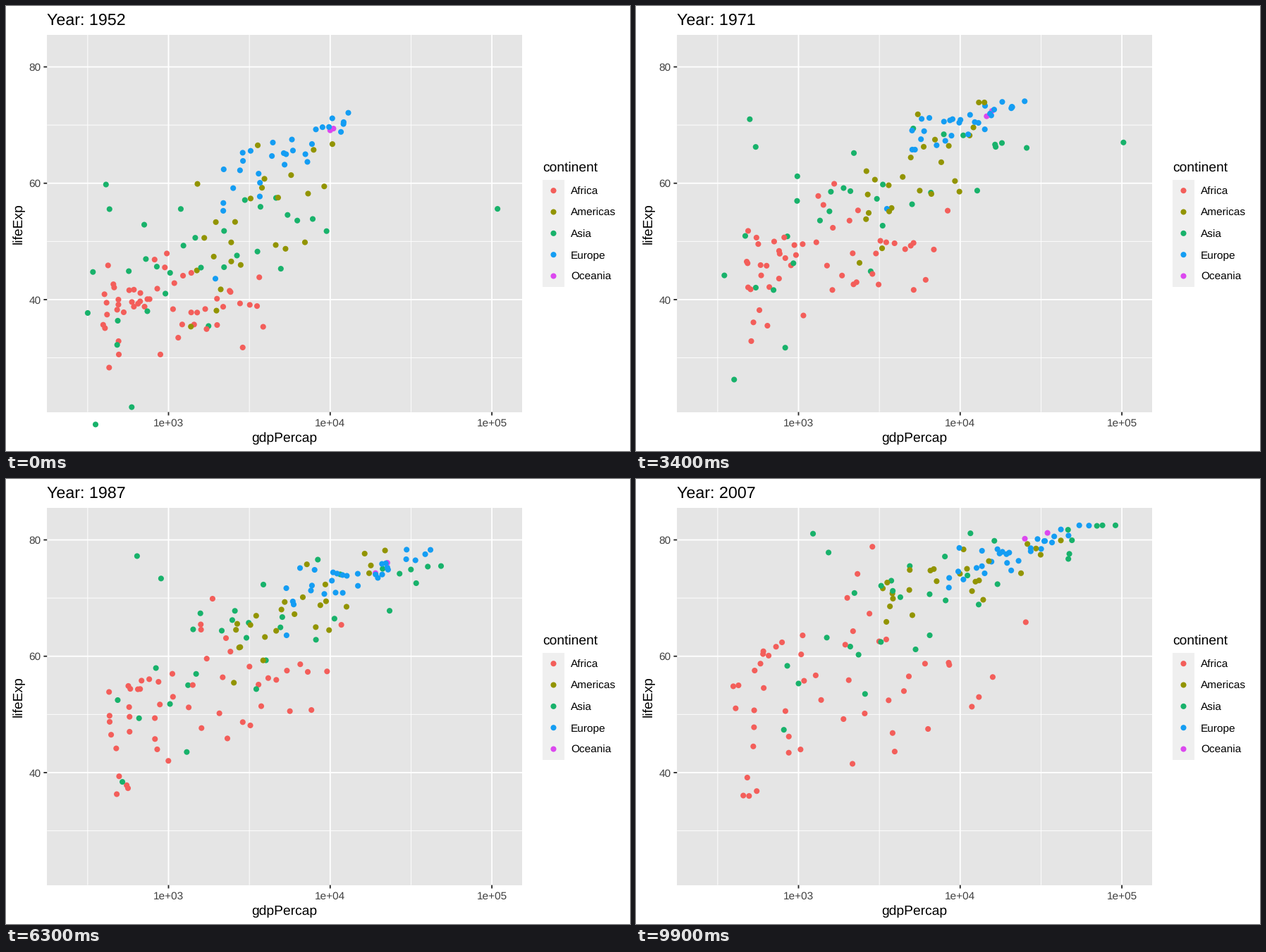
Write a matplotlib script that moves like this. It is 885x632 px and loops after 10000 ms.

```python
import matplotlib.pyplot as plt
import numpy as np
from matplotlib.animation import FuncAnimation
from matplotlib.patches import Rectangle

W, H, DPI = 885, 632, 100
FRAMES, INTERVAL = 100, 100
PT = 72 / DPI  # points per pixel

COLORS = {"Africa": "#F35E5A", "Americas": "#929400", "Asia": "#18B26B",
          "Europe": "#149DF3", "Oceania": "#DC48EF"}

WAVES = np.arange(1952, 2008, 5)
YEARS = np.linspace(1952, 2007, FRAMES)
rng = np.random.default_rng(52)

# Per cloud: dots, skew of income, narrowing of the spread with income, and
# (year, log income, its spread, life expectancy, slope, scatter) on the way.
CLOUDS = {
    "Africa": (51, 0.2, 0.0, [(1952, 2.98, 0.28, 39.1, 5, 4.8), (1977, 3.18, 0.36, 49.6, 9, 6.0),
                              (1992, 3.14, 0.40, 54.2, 13, 6.8), (2007, 3.21, 0.44, 54.9, 8, 8.7)]),
    "Americas": (25, 0.1, 0.3, [(1952, 3.52, 0.24, 53.3, 20, 7.2), (1977, 3.79, 0.23, 64.4, 22, 4.8),
                                (1992, 3.79, 0.30, 69.6, 12, 3.6), (2007, 3.95, 0.32, 73.6, 8, 3.0)]),
    "Asia": (32, 0.1, 0.3, [(1952, 3.14, 0.41, 46.0, 11, 8.0), (1977, 3.42, 0.53, 59.4, 12, 7.2),
                            (1992, 3.60, 0.52, 66.4, 10, 5.6), (2007, 3.79, 0.52, 70.5, 11, 5.2)]),
    "Europe": (29, 0.0, 0.3, [(1952, 3.71, 0.23, 65.1, 14, 2.3), (1977, 4.12, 0.18, 72.2, 7, 1.2),
                              (1992, 4.16, 0.27, 74.7, 8, 1.7), (2007, 4.34, 0.22, 77.9, 10, 1.3)]),
}

# Dots that travel apart from their cloud: (year, log income, life expectancy).
LONERS = [
    ("Oceania", [(1952, 4.00, 69.1), (1977, 4.26, 73.5), (2007, 4.54, 81.2)]),
    ("Oceania", [(1952, 4.02, 69.4), (1977, 4.21, 72.2), (1987, 4.28, 74.3), (2007, 4.40, 80.2)]),
    ("Asia", [(1952, 5.035, 55.6), (1957, 5.055, 58.0), (1967, 4.908, 64.6), (1972, 5.039, 67.7),
              (1977, 4.773, 69.3), (1982, 4.496, 71.3), (2007, 4.675, 77.6)]),
    ("Africa", [(1952, 2.69, 40.0), (1987, 2.93, 44.0), (1992, 2.87, 23.6),
                (1997, 2.77, 36.1), (2007, 2.94, 46.2)]),
    ("Europe", [(1952, 3.29, 43.6), (1977, 3.63, 59.5), (2007, 3.93, 71.8)]),
]


def px(log_income):
    return 230.5 + 229.3 * (log_income - 3)


def py(life):
    return 417 - 8.263 * (life - 40)


def along(times, stops):
    """Columns of the stops, interpolated at the given times."""
    year, *columns = np.transpose(stops)
    return [np.interp(times, year, c) for c in columns]


def turn(a, b, angle):
    """Blend slowly from a to b, one row per wave."""
    angle = np.linspace(0, angle, len(WAVES))[:, None]
    return a * np.cos(angle) + b * np.sin(angle)


def normals(n):
    v = rng.standard_normal(n)
    return np.clip((v - v.mean()) / v.std(), -2, 1.8)


def cloud_tracks(n, skew, narrowing, stops):
    mean, spread, life, slope, scatter = (c[:, None] for c in along(WAVES, stops))
    ranks = np.linspace(-1.75, 1.75, n)
    u = turn(rng.permutation(ranks), rng.permutation(ranks), 0.3)
    v = turn(normals(n), normals(n), 0.7)
    u = u + skew * (u ** 2 - 1)
    x = mean + spread * u + rng.normal(0, 0.02, u.shape)
    y = life + slope * spread * u + scatter * (1 - narrowing * u) * v
    y = np.minimum(y + rng.normal(0, 0.3, y.shape), 70 + 12.5 * (WAVES[:, None] - 1937) / 70)
    for i in range(n):
        yield [np.interp(YEARS, WAVES, c[:, i]) for c in (x, y)]


dots = [(name, along(YEARS, stops)) for name, stops in LONERS]
for name, spec in CLOUDS.items():
    dots += [(name, t) for t in cloud_tracks(*spec)]
dots = [dots[i] for i in rng.permutation(len(dots))]
tracks = np.array([np.column_stack([px(x), py(y)]) for _, (x, y) in dots])

plt.rcParams["font.family"] = "Liberation Sans"
plt.rcParams["text.hinting"] = "none"
fig = plt.figure(figsize=(W / DPI, H / DPI), dpi=DPI, facecolor="white")
ax = fig.add_axes([0, 0, 1, 1])
ax.set(xlim=(0, W), ylim=(H, 0))
ax.axis("off")

LEFT, RIGHT, TOP, BOTTOM = 58.2, 732.3, 40.7, 576.7
MAJOR, MINOR = 1.87, 0.94
TICK, TICK_TEXT = "#2A2A2A", "#404040"


def box(x, y, w, h, color):
    ax.add_patch(Rectangle((x, y), w, h, fc=color, lw=0, zorder=0))


def line(xs, ys, width, color="white"):
    ax.plot(xs, ys, color=color, lw=width * PT, solid_capstyle="butt",
            snap=False, zorder=1)


def label(x, y, text, size, color="black", **kw):
    return ax.text(x, y, text, fontsize=size * PT, color=color, va="baseline", **kw)


def scatter(points, colors):
    return ax.scatter(*np.transpose(points), s=(8.1 * PT) ** 2, c=colors,
                      linewidths=0, zorder=3)


box(LEFT, TOP, RIGHT - LEFT, BOTTOM - TOP, "#E5E5E5")
for e in (2.5, 3.5, 4.5):
    line([px(e)] * 2, [TOP, BOTTOM], MINOR)
for v in (30, 50, 70):
    line([LEFT, RIGHT], [py(v)] * 2, MINOR)
for e in (3, 4, 5):
    line([px(e)] * 2, [TOP, BOTTOM], MAJOR)
    line([px(e)] * 2, [BOTTOM, BOTTOM + 4.8], MAJOR, TICK)
    label(px(e), 597, f"1e+0{e}", 15.45, TICK_TEXT, ha="center")
for v in (40, 60, 80):
    line([LEFT, RIGHT], [py(v)] * 2, MAJOR)
    line([LEFT - 4.8, LEFT], [py(v)] * 2, MAJOR, TICK)
    label(49.5, py(v) + 5.5, str(v), 15.45, TICK_TEXT, ha="right")

label(395, 619, "gdpPercap", 19.3, ha="center")
label(23, 308.7, "lifeExp", 19.3, ha="center", rotation=90, rotation_mode="anchor")
title = label(58, 26.3, "", 23.3)

KEY = 30.34
label(761, 235, "continent", 19.3)
box(761.3, 247, KEY, 5 * KEY, "#EFEFEF")
keys = [(776.5, 247 + KEY * (i + 0.5)) for i in range(5)]
scatter(keys, list(COLORS.values()))
for (_, y), name in zip(keys, COLORS):
    label(801, y + 5.8, name, 15.45)

cloud = scatter(tracks[:, 0], [COLORS[name] for name, _ in dots])


def draw(frame):
    cloud.set_offsets(tracks[:, frame])
    title.set_text(f"Year: {YEARS[frame]:.0f}")
    return cloud, title


anim = FuncAnimation(fig, draw, frames=FRAMES, interval=INTERVAL,
                     repeat=True, repeat_delay=0, blit=False)
plt.show()
```
